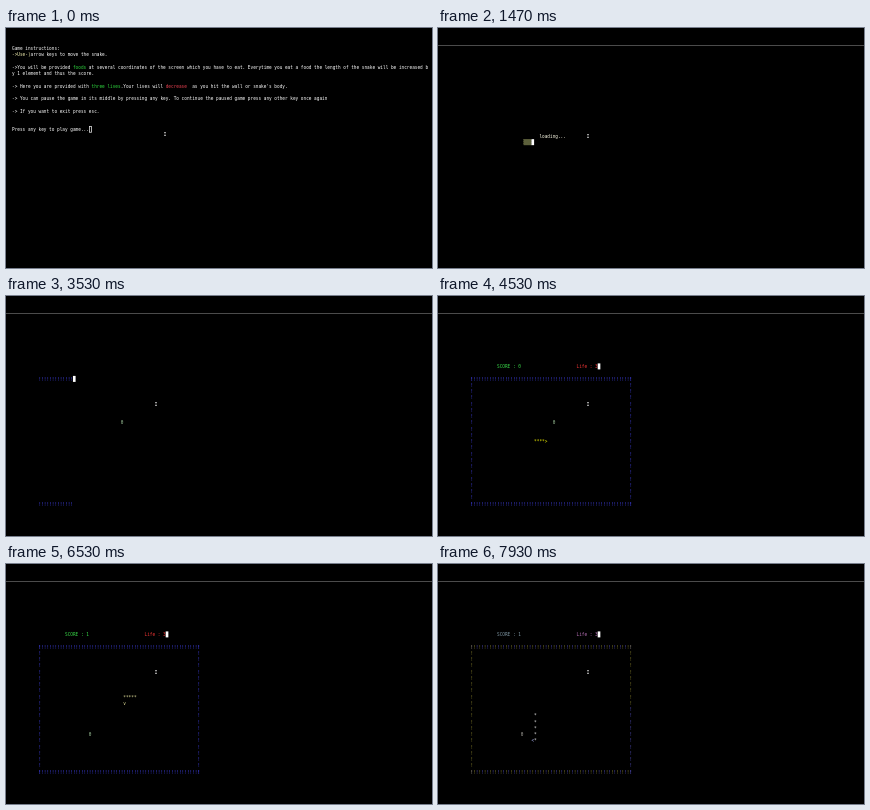
These frames come from a looping animation (426x240 px, 8000 ms). An HTML page with a canvas:

```html
<!DOCTYPE html>
<html lang="en">
<head>
<meta charset="utf-8">
<title>Console snake</title>
<style>
html, body { margin: 0; width: 100%; height: 100%; overflow: hidden; background: #000; }
canvas { display: block; width: 100%; height: 100%; }
</style>
</head>
<body>
<canvas id="stage" width="426" height="240"></canvas>
<script>
const ctx = document.getElementById('stage').getContext('2d');
const LOOP = 8000, CELL_W = 2.65, CELL_H = 6.25, LEFT = 6, TOP = 17.4;
const LOAD_START = 1020, LOAD_STEP = 115, GAME_START = 3339, MOVE_MS = 86.8;
const PAUSE_START = 7330, PAUSE_END = 7600;
const EAT_MOVE = 19;
const BOX = { left: 10, right: 70, top: 10, bottom: 30 };

const DAY = { border: () => '#4141e8', score: '#38d848', life: '#ee3434', food: '#a0c89c' };
const DUSK = {
  border: i => i % 2 ? '#8c862c' : '#5550c4',
  score: '#7d95a2', life: '#b56fb4', food: '#aaa8a0'
};

const colX = col => LEFT + col * CELL_W;
const rowY = row => TOP + row * CELL_H;

function rect(x, y, w, h, color) {
  ctx.fillStyle = color;
  ctx.fillRect(x, y, w, h);
}

// Each character sits in its own console cell; the scale keeps subpixel placement.
function print(col, row, text, color = '#fff') {
  ctx.save();
  ctx.scale(0.25, 0.25);
  ctx.font = '17.6px "DejaVu Sans Mono", monospace';
  ctx.fillStyle = color;
  [...text].forEach((ch, i) => {
    if (ch !== ' ') ctx.fillText(ch, colX(col + i) * 4, (rowY(row) + 4.7) * 4);
  });
  ctx.restore();
}

function printParts(row, parts) {
  let col = 0;
  for (const [text, color] of parts) {
    print(col, row, text, color);
    col += text.length;
  }
}

const cursor = (col, row) => rect(colX(col), rowY(row), CELL_W, 6, '#fff');

function pointer(time) {
  const k = Math.min(1, Math.max(0, (time - 300) / 500));
  const ease = k * k * (3 - 2 * k);
  const x = Math.round(158 - 9 * ease), y = Math.round(104 + 2 * ease);
  rect(x, y, 2, 1, '#999');
  rect(x + 0.5, y + 1, 1, 2, '#666');
  rect(x, y + 3, 2, 1, '#999');
}

function instructions() {
  const green = '#2fd83f';
  print(0, 0, 'Game instructions:');
  printParts(1, [['->Use-)', '#f2efb0'], ['arrow keys to move the snake.']]);
  printParts(3, [
    ['->You will be provided '], ['foods', green],
    [' at several coordinates of the screen which you have to eat. Everytime you eat a food the length of the snake will be increased b']
  ]);
  print(0, 4, 'y 1 element and thus the score.');
  printParts(6, [
    ['-> Here you are provided with '], ['three lives', green], ['.Your lives will '],
    ['decrease', '#e84050'], ["  as you hit the wall or snake's body."]
  ]);
  print(0, 8, '-> You can pause the game in its middle by pressing any key. To continue the paused game press any other key once again');
  print(0, 10, '-> If you want to exit press esc.');
  print(0, 13, 'Press any key to play game...');
  ctx.strokeStyle = '#ddd';
  ctx.lineWidth = 0.8;
  ctx.strokeRect(colX(29) + 0.6, rowY(13) - 0.2, 2, 5.8);
}

function loading(time) {
  const count = Math.min(20, Math.floor((time - LOAD_START) / LOAD_STEP));
  print(36, 14, 'loading...', '#fffde8');
  const width = count * CELL_W;
  rect(colX(30), rowY(15), width, 6, '#4c5030');
  for (let y = 0; y < 6; y++)
    for (let x = y % 2; x < width; x += 2) rect(colX(30) + x, rowY(15) + y, 1, 1, '#71744a');
  cursor(30 + count, 15);
}

// Expand the turning points into one cell per move.
const turns = [[25, 20], [41, 20], [41, 15], [47, 15], [47, 18], [42, 18], [42, 21], [34, 21], [34, 25], [20, 25]];
const path = [{ x: 25, y: 20, head: '>' }];
for (const [tx, ty] of turns.slice(1)) {
  let { x, y } = path[path.length - 1];
  while (x !== tx || y !== ty) {
    const dx = Math.sign(tx - x), dy = Math.sign(ty - y);
    x += dx;
    y += dy;
    path.push({ x, y, head: dx > 0 ? '>' : dx < 0 ? '<' : dy < 0 ? '^' : 'v' });
  }
}

function snake(move, length, dusk) {
  const color = dusk ? '#f0f0f0' : move < EAT_MOVE ? '#f0f000' : '#e6e49c';
  for (let i = Math.max(0, move - length + 1); i < move; i++) print(path[i].x, path[i].y, '*', color);
  const { x, y, head } = path[move];
  print(x, y, head, dusk ? '#a8b0f0' : color);
}

// Every move clears the console and prints it again piece by piece.
function game(time) {
  const dusk = time >= PAUSE_END, look = dusk ? DUSK : DAY;
  const clock = dusk ? time - MOVE_MS : Math.min(time, PAUSE_START);
  const steps = (clock - GAME_START) / MOVE_MS;
  const move = Math.floor(steps), phase = steps - move;
  const eaten = move >= EAT_MOVE ? 1 : 0;

  if (phase < 0.05) return cursor(0, 0);
  const [foodX, foodY] = eaten ? [29, 24] : [41, 17];
  print(foodX, foodY, '0', look.food);

  const cols = Math.min(61, Math.floor((phase - 0.125) * 174));
  if (cols <= 0) return cursor(foodX + 1, foodY);
  for (let i = 0; i < cols; i++) {
    print(BOX.left + i, BOX.top, '!', look.border(i));
    print(BOX.left + i, BOX.bottom, '!', look.border(i));
  }
  if (cols < 61) return cursor(BOX.left + cols, BOX.top);

  const rows = Math.min(21, Math.floor((phase - 0.475) * 170));
  for (let i = 0; i < rows; i++) {
    print(BOX.left, BOX.top + i, '!', look.border(1));
    print(BOX.right, BOX.top + i, '!', look.border(i < 10 ? 1 : 0));
  }
  if (rows < 21) return cursor(BOX.right + 1, BOX.top + rows);

  snake(move, 5 + eaten, dusk);
  print(20, 8, 'SCORE : ' + eaten, look.score);
  print(50, 8, 'Life : 3', look.life);
  cursor(58, 8);
}

function draw(now) {
  const tick = Math.min(119, Math.floor((now % LOOP) * 0.015 + 0.1));
  const time = Math.round(tick * 20 / 3) * 10;
  rect(0, 0, 426, 240, '#000');
  if (time >= 70) rect(0, 17, 426, 1, '#4b4b4b');
  if (time < LOAD_START) instructions();
  else if (time < GAME_START) loading(time);
  else game(time);
  pointer(time);
}

const start = performance.now();
function frame() {
  draw(performance.now() - start);
  requestAnimationFrame(frame);
}
frame();
</script>
</body>
</html>
```
